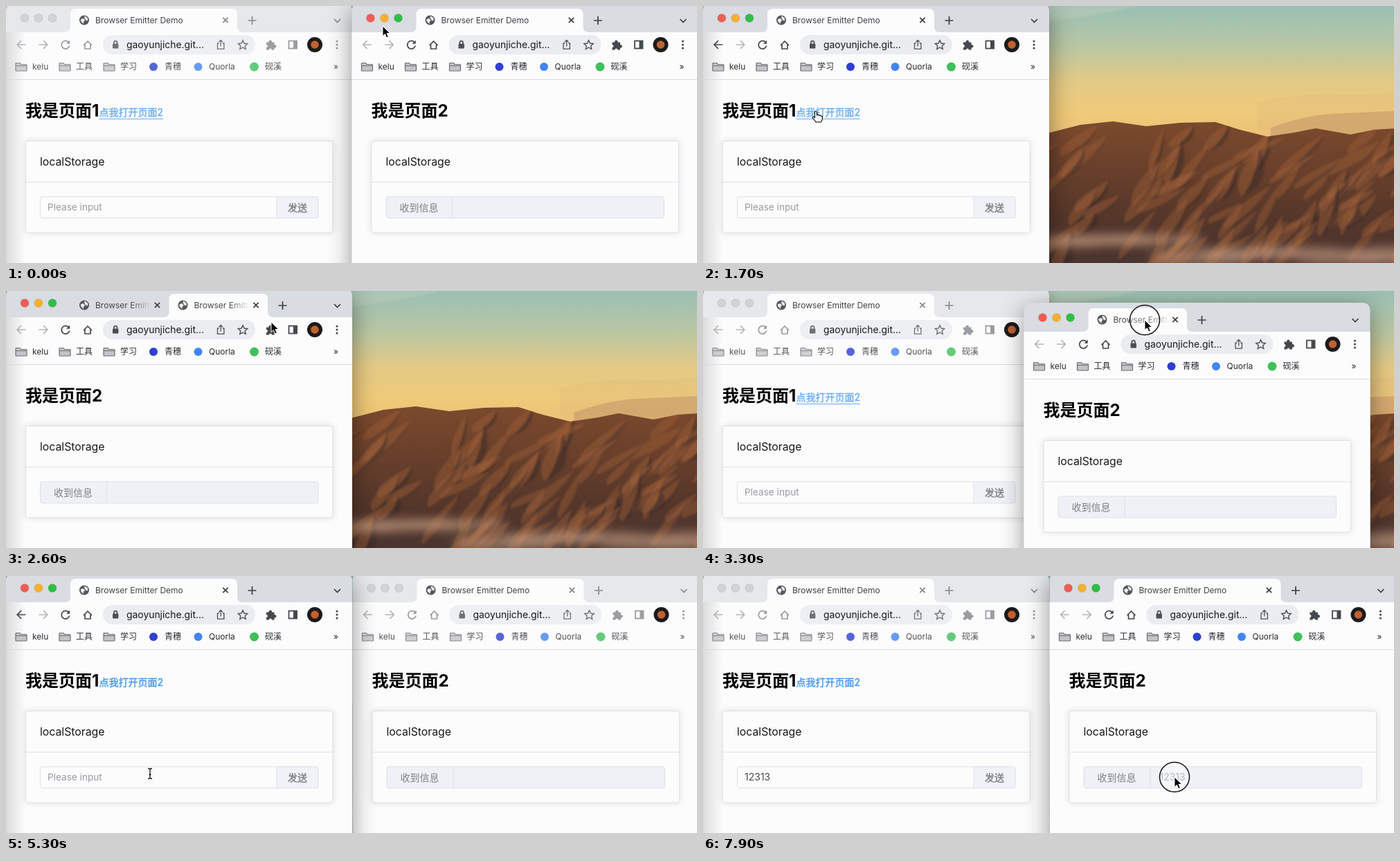
Recreate the animation shown at these times as an HTML page. Size 998 by 372 pixels, loop 8000 ms.

```html
<!DOCTYPE html>
<html lang="zh">
<head>
<meta charset="utf-8">
<title>Browser Emitter Demo</title>
<style>
html, body { margin: 0; width: 100%; height: 100%; overflow: hidden; }
svg { display: block; width: 100vw; height: 100vh; }
text { font-family: Inter, "Noto Sans CJK SC", "Noto Sans CJK", sans-serif; white-space: pre; }
.line { fill: none; stroke: currentColor; stroke-width: 1.7; }
.solid { fill: currentColor; }
.medium { stroke: currentColor; stroke-width: .35; }
.shadow { filter: drop-shadow(0 8px 17px rgba(0, 0, 0, .42)); }
.idle .shadow { filter: drop-shadow(0 5px 10px rgba(0, 0, 0, .25)); }
.card { fill: #fcfcfd; stroke: #dfe1e7; filter: drop-shadow(0 0 5px rgba(0, 0, 0, .12)); }
.rule { stroke: #dcdfe6; fill: none; }
</style>
</head>
<body>
<svg viewBox="0 0 998 372">
  <defs>
    <linearGradient id="sky" x2="0" y2="1">
      <stop stop-color="#9abfb5"/><stop offset=".28" stop-color="#bac6a3"/>
      <stop offset=".52" stop-color="#e3ca86"/><stop offset=".75" stop-color="#efca78"/><stop offset="1" stop-color="#e9bb78"/>
    </linearGradient>
    <linearGradient id="earth" x2="0" y2="1">
      <stop stop-color="#7d4a2d"/><stop offset=".35" stop-color="#69402b"/>
      <stop offset=".7" stop-color="#54362a"/><stop offset="1" stop-color="#4b3531"/>
    </linearGradient>
    <linearGradient id="edge"><stop stop-opacity=".13"/><stop offset="1" stop-opacity="0"/></linearGradient>
    <linearGradient id="fade" gradientUnits="userSpaceOnUse" x1="88" x2="116">
      <stop stop-color="#45484c"/><stop offset="1" stop-color="#45484c" stop-opacity="0"/>
    </linearGradient>
    <clipPath id="land"><path id="ridge"/></clipPath>
    <filter id="soft" x="-50%" y="-100%" width="200%" height="300%"><feGaussianBlur stdDeviation="7"/></filter>
    <filter id="blend"><feGaussianBlur stdDeviation="1.6"/></filter>
  </defs>
  <g id="wall"></g>
  <g id="windows"></g>
  <g id="pointer"></g>
</svg>
<script>
const $ = id => document.getElementById(id);
const clamp = v => Math.max(0, Math.min(1, v));
const mix = (a, b, k) => a + (b - a) * k;
const text = (x, y, size, fill, s, extra = '') =>
  `<text x="${x}" y="${y}" font-size="${size}" fill="${fill}" ${extra}>${s}</text>`;
const medium = (x, y, size, color, s) => text(x, y, size, color, s, `class="medium" color="${color}"`);
const line = (d, extra = '') => `<path class="line" d="${d}" ${extra}/>`;
const solid = d => `<path class="solid" d="${d}"/>`;
const dot = (x, y, r, fill, extra = '') => `<circle cx="${x}" cy="${y}" r="${r}" fill="${fill}" ${extra}/>`;
const rect = (x, y, w, h, fill, extra = '') =>
  `<rect x="${x}" y="${y}" width="${w}" height="${h}" fill="${fill}" ${extra}/>`;

// Wallpaper: sky, hills with lit and shaded folds, low mist
function wallpaper() {
  let seed = 11;
  const rnd = () => (seed = seed * 16807 % 2147483647) / 2147483647;
  const top = [[490, 186], [545, 172], [592, 167], [640, 174], [690, 169], [740, 168], [775, 179],
    [815, 189], [855, 183], [885, 177], [935, 186], [970, 179], [1000, 177]];
  $('ridge').setAttribute('d', `M${top.join('L')}V372H490Z`);
  let folds = '';
  for (let i = 0; i < 90; i++) {
    const y = 165 + i * 1.9, x = 490 + rnd() * 570, h = 30 + rnd() * 45;
    const lean = -20 - rnd() * 55, w = 8 + rnd() * 14;
    const fold = (dx, fill, o) =>
      `<path d="M${x} ${y}q${lean * .2} ${h * .6} ${lean} ${h}q${dx - lean * .1} ${-h * .3} ${-lean} ${-h}" fill="${fill}" opacity="${o}"/>`;
    folds += fold(-w, '#a0623a', .4) + fold(w * 2, '#33262a', .42);
  }
  let mist = '';
  for (let i = 0; i < 8; i++)
    mist += `<ellipse cx="${510 + i * 70}" cy="${mix(338, 366, rnd())}" rx="75" ry="${8 + rnd() * 6}" fill="#c9a084" opacity=".5"/>`;
  return rect(0, 0, 998, 210, 'url(#sky)') +
    '<path d="M500 0h130q-60 14-130 22z" fill="#c7cfb9" opacity=".4" filter="url(#blend)"/>' +
    '<path d="M800 140Q860 126 915 128T998 124V180H800Z" fill="#d5b27c" opacity=".25"/>' +
    '<path d="M820 176Q870 158 910 156T998 152V200H820Z" fill="#c99d6c" opacity=".65"/>' +
    `<g clip-path="url(#land)">${rect(490, 165, 510, 207, 'url(#earth)')}<g filter="url(#blend)">${folds}</g></g>` +
    `<g filter="url(#soft)">${mist}</g>`;
}

function tab(x, w, front, fill) {
  const shape = front
    ? `<path d="M-8 38Q0 38 0 30V12Q0 4 8 4H${w - 8}Q${w} 4 ${w} 12V30Q${w} 38 ${w + 8} 38Z" fill="${fill}"/>` : '';
  const c = w - 17;
  return `<g transform="translate(${x})">${shape}` +
    dot(20, 20.5, 7, '#54585d') +
    '<path d="M15 19l4-1 2 3-2 2v3l-4-4zM21 14.5l4 3v4l-3-1-2-4z" fill="#fff" opacity=".9"/>' +
    text(36, 25, 12, w < 200 ? 'url(#fade)' : '#3f4246', 'Browser Emitter Demo') +
    line(`M${c - 3.7} 16.8l7.4 7.4m0-7.4l-7.4 7.4`) + '</g>';
}

function toolbar(active, canGoBack) {
  const tone = active ? '#45494e' : '#9a9da2';
  const grey = '#b4b6ba';
  const folder = x => `<path transform="translate(${x} 82)" fill="#c3c4c7" stroke="#6c6f73" stroke-width="1.2"
    d="M0 1.5Q0 .5 1 .5H6L7.5 2.5H15Q16 2.5 16 3.5V11Q16 12 15 12H1Q0 12 0 11ZM0 4.5H16"/>`;
  const labels = [[38, 'kelu'], [101, '工具'], [165, '学习'], [229, '青穗'], [293, 'Quorla'], [374, '砚溪'], [473, '»']];
  return `<g color="${tone}">` +
    line('M28.5 56H16.5M22 50.2L16.2 56 22 61.8', canGoBack ? '' : `color="${grey}"`) +
    line('M47.5 56H59.5M54 50.2L59.8 56 54 61.8', `color="${grey}"`) +
    line('M90.4 52.4A5.8 5.8 0 1 0 91.7 57.4') + solid('M92.2 49.6v5.2h-5.2z') +
    line('M112 57L118 51 124 57M114 55.5V62H122V55.5') +
    rect(140, 42, 220, 28, active ? '#eaecf0' : '#eeeff2', 'rx="14"') + '</g>' +
    `<g color="${active ? '#4b4e53' : '#6d7075'}">` +
    rect(154, 54.5, 8.4, 7, 'currentColor', 'rx="1"') + line('M155.9 55v-2a2.3 2.3 0 0 1 4.6 0v2') +
    line('M307.5 54h-2v8.2h9.4V54h-2M310.2 58.5V49.5M307.4 52.2L310.2 49.4 313 52.2', 'style="stroke-width:1.3"') +
    line('M342 49.6l2 4.4 4.7.5-3.5 3.2 1 4.7-4.2-2.4-4.2 2.4 1-4.7-3.5-3.2 4.7-.5z', 'style="stroke-width:1.4"') + '</g>' +
    text(174, 61, 13.9, '#16181b', 'gaoyunjiche.git...') +
    `<g color="${tone}">` +
    solid('M376 52.5h3.6a2.3 2.3 0 1 1 4.4 0h3.5v3.6a2.3 2.3 0 1 1 0 4.4v3h-3.6a2 2 0 1 0-4 0H376v-3.6a2 2 0 1 0 0-4z') +
    rect(408.5, 50.5, 11.5, 11, 'none', 'stroke="currentColor" stroke-width="1.8"') + rect(415, 50, 5.5, 12, 'currentColor') +
    [51, 56, 61].map(y => dot(478, y, 1.6, 'currentColor')).join('') + '</g>' +
    dot(446, 56, 11, '#1c1a1c') + dot(446, 56, 5.8, '#c0622f') +
    `<g opacity="${active ? 1 : .8}">` + [14, 77, 141].map(folder).join('') +
    dot(213, 88, 6, '#2f3fd0') + dot(277.5, 88, 6, '#4285f4') + dot(358.5, 88, 6.5, '#3fc05a') +
    labels.map(([x, s]) => text(x, 92, 12, '#26292c', s)).join('') + '</g>';
}

function page1({ hover, typed, focus }) {
  const blue = hover ? '#66abf5' : '#3d95f5';
  return text(28, 160, 24, '#000', '我是页面1', 'font-weight="700"') +
    medium(134.5, 159, 14, blue, '点我打开页面2') +
    (hover ? `<path d="M134.5 163.5H227" stroke="${blue}"/>` : '') +
    card() + rect(391, 276.5, 60, 30.5, '#f1f2f7') +
    rect(49.5, 276, 401.5, 31, 'none', 'class="rule" rx="3.5"') +
    '<path class="rule" d="M391 276V307"/>' +
    (focus ? rect(49.5, 276, 341.5, 31, 'none', 'stroke="#409eff" rx="3.5"') : '') +
    (typed ? text(60, 296.3, 14, '#4a4c50', typed) : text(60, 296.3, 13.6, '#989ba2', 'Please input')) +
    medium(407, 296.5, 14, '#7b7e84', '发送');
}

function page2({ received }) {
  return text(28, 160, 24, '#000', '我是页面2', 'font-weight="700"') + card() +
    rect(49.5, 276, 401.5, 31, '#f0f1f7', 'rx="3.5" stroke="#dcdfe6"') +
    '<path class="rule" d="M145.5 276V307"/>' +
    text(69, 296.5, 14, '#7b7e84', '收到信息') + text(159, 296.3, 14, '#989ba2', received);
}

function card() {
  return '<rect class="card" x="28.5" y="195.5" width="443.5" height="132.5" rx="3.5"/>' +
    '<path class="rule" d="M29 255H472"/>' + text(49, 231, 15.8, '#17181b', 'localStorage');
}

function browser({ x, y, page, active, tabs, state }) {
  const strip = active ? '#d9dce1' : '#e6e8eb', paper = '#fcfcfd';
  const lights = active ? ['#ee5d55', '#f6b02f', '#2fbe45'] : Array(3).fill('#d2d3d7');
  const end = 93 + tabs.length * tabs[0];
  return `<g transform="translate(${x.toFixed(2)} ${y.toFixed(2)})" class="${active ? '' : 'idle'}">` +
    rect(0, -4, 500, 420, strip, 'rx="10" class="shadow"') +
    rect(0, 38, 500, 380, paper) +
    (x < 1 ? rect(0, 38, 28, 334, 'url(#edge)') : '') +
    lights.map((c, i) => dot(27 + i * 20, 17.5, 6, c, 'stroke="#000" stroke-opacity=".09"')).join('') +
    `<g color="${active ? '#3b3f44' : '#85888d'}">` +
    tabs.map((w, i) => tab(93 + i * w, w, i === tabs.length - 1, paper)).join('') +
    line(`M${end + 15.5} 21h12m-6-6v12`) + line('M474 19l4.5 4.5 4.5-4.5') + '</g>' +
    toolbar(active, active && page === page1) +
    '<path d="M0 106.5H500" stroke="#dadbde"/>' + page(state) + '</g>';
}

// Pointer path: time, x, y
const path = [[0, 544, 29], [350, 527, 18], [650, 527, 18], [1500, 163, 152], [2000, 163, 152],
  [2600, 383, 45], [2850, 318, 21], [2920, 318, 21], [3300, 638, 42], [3900, 671, 14], [4050, 669, 15],
  [4200, 669, 15], [4900, 208, 286], [6350, 208, 286], [6700, 421, 291], [7000, 421, 291], [7650, 681, 291], [8000, 681, 291]];
const presses = [[500, 600], [1880, 1980], [2880, 4100], [4950, 5050], [5500, 5600], [6750, 6850], [7760, 8000]];

function pointerAt(t) {
  const i = path.findIndex(p => p[0] > t), [a, b] = [path[i - 1], path[i]];
  const k = (t - a[0]) / (b[0] - a[0]), e = k * k * (3 - 2 * k);
  return [mix(a[1], b[1], e), mix(a[2], b[2], e)];
}

const between = (t, a, b) => t >= a && t < b;
const shapes = {
  arrow: '<path d="M0 0V14.5L3.4 11.4 5.7 16.8 8.3 15.7 6 10.5H10.6Z" fill="#000" stroke="#fff"/>',
  hand: '<path d="M-1.5 1.5Q0-1 1.5 1.5V6Q3.5 4.5 4.5 6.5 6.5 5.5 7.3 7.5 9.5 7 9.5 9.5 9.5 13 7.5 16H0L-2 13-5 9.5Q-4.5 7-1.5 9.5Z" fill="#fff" stroke="#000" stroke-width="1.1"/>',
  beam: '<path d="M-3-7.5Q0-7.5 0-5.5 0-7.5 3-7.5M0-5.5V6M-3 7.5Q0 7.5 0 5.5 0 7.5 3 7.5M-1.5 1.5H1.5" fill="none" stroke="#111" stroke-width="1.3"/>'
};

const full = 241, narrow = 142.5;
let shown = '';

function draw(t) {
  const [px, py] = pointerAt(t);
  const twoTabs = between(t, 2000, 3000);
  const firstActive = between(t, 600, 3000) || between(t, 5000, 7800);
  const first = browser({
    x: 0, y: 0, active: firstActive,
    page: twoTabs ? page2 : page1,
    tabs: twoTabs ? [narrow, narrow] : [full],
    state: {
      hover: t < 4800, received: '', focus: between(t, 5550, 6800),
      typed: '12313'.slice(0, Math.max(0, Math.floor((t - 5700) / 120)))
    }
  });
  let second = '';
  if (t < 600 || t >= 3000) {
    const dragging = between(t, 3000, 4100);
    const grab = 174.5 - 6 * clamp((t - 3300) / 600);
    second = browser({
      x: dragging ? px - grab : t < 600 ? 499.5 : 500.5,
      y: dragging ? Math.max(0, py - 21) : 0,
      page: page2, active: !firstActive, tabs: [dragging ? narrow : full],
      state: { received: t >= 6850 ? '12313' : '' }
    });
  }
  const html = firstActive ? second + first : first + second;
  if (html !== shown) $('windows').innerHTML = shown = html;

  const kind = between(t, 1450, 2080) || between(t, 6620, 7100) ? 'hand'
    : between(t, 4850, 6500) ? 'beam' : 'arrow';
  const pressed = presses.some(([a, b]) => between(t, a, b));
  $('pointer').setAttribute('transform', `translate(${px.toFixed(2)} ${py.toFixed(2)})`);
  $('pointer').innerHTML = (pressed ? dot(0, 0, 21.5, '#fff', 'fill-opacity=".3" stroke="#111" stroke-width="1.5"') : '') + shapes[kind];
}

$('wall').innerHTML = wallpaper();
const start = performance.now();
function tick() {
  draw((performance.now() - start) % 8000);
  requestAnimationFrame(tick);
}
tick();
</script>
</body>
</html>
```
